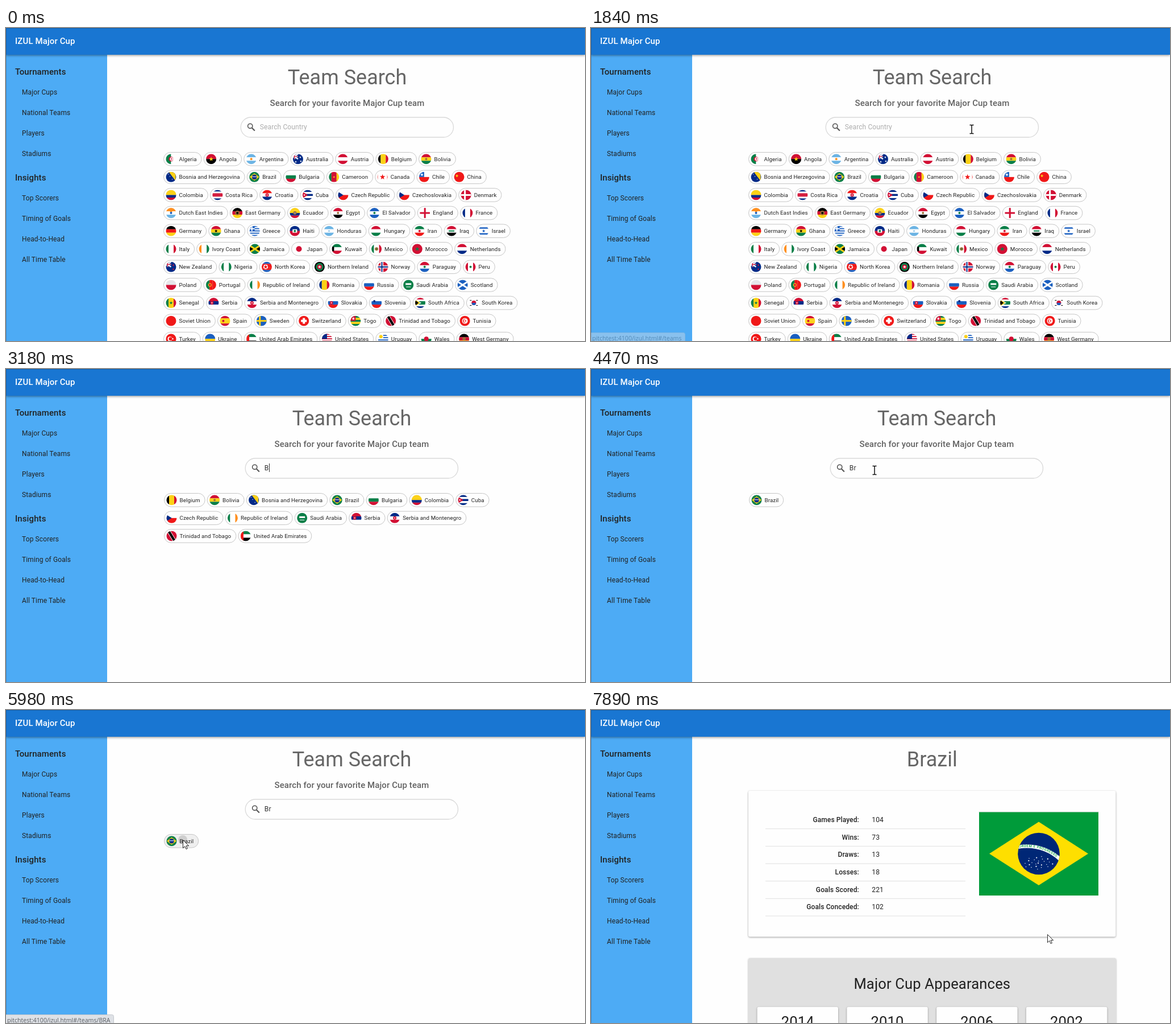
An HTML page for the animation above (8 s loop, 1019 by 550 pixels).

```html
<!DOCTYPE html>
<html lang="en">
<head>
<meta charset="utf-8">
<title>Team Search</title>
<style>
  html, body { margin: 0; width: 100%; height: 100%; overflow: hidden; background: #fefefe; }
  svg { display: block; width: 100vw; height: 100vh; }
  text { font-family: Roboto, sans-serif; fill: #212121; white-space: pre; }
  .paper { fill: #fefefe; filter: drop-shadow(0 1px 1.5px #0006); }
  .chip rect.pill { stroke: #c6c6c6; }
</style>
</head>
<body>
<svg id="stage" viewBox="0 0 1019 550"></svg>
<script>
const LOOP = 8000;
const COLORS = {
  r: '#d21034', b: '#012a87', g: '#0a7f48', y: '#fcd116', w: '#fff', k: '#000',
  o: '#ff8f1f', c: '#6cb4e4', n: '#a0703a', l: '#1a5fc0', e: '#e6e6ea', f: '#f01818'
};
// Each flag is a list of marks: kind, colour letters, then sizes (flag space is centred on 0,0).
const TEAMS = `Algeria|vgw or4 ow3,1 sr2,1
Angola|hrk sy4
Argentina|hcwc oo2
Australia|hb uw sw2,-4,5 sw2,4,-3 sw2,5,4
Austria|hrwr
Belgium|vkyr
Bolivia|hryg on2
Bosnia and Herzegovina|hb py-4,-9,8,-9,8,7 sw1,-5,-5 sw1,-2,-1 sw1,2,4
Brazil|hg py-8.5,0,0,-6.5,8.5,0,0,6.5 ob4.3 bw-4,-1,8,1
Bulgaria|hwgr
Cameroon|vgry sy2
Canada|vfwwwf sf5
Chile|hwf ql sw3,-4,-4
China|hf sy3,-4,-2
Colombia|hyybr
Costa Rica|hbwrrwb
Croatia|hfwb or3 ow1
Cuba|hbwbwb tr sw2,-6
Czech Republic|hwf tb
Czechoslovakia|hwf tb
Denmark|hr xw3,-2
Dutch East Indies|howc oo2,0,-3 ol2
East Germany|hkry on4 ok2
Ecuador|hyybr on3 oc1
Egypt|hrwk on2
El Salvador|hlwl og2
England|hw xr3
France|vbwr
Germany|hkfy
Ghana|hryg sk3
Greece|hlwlwlwlwl ql bw-9,-5,9,2 bw-6,-9,2,9
Haiti|hbr bw-4,-3,8,6 og2
Honduras|hcwc sc2
Hungary|hrwg
Iran|hgwf or2
Iraq|hrwk bg-5,-1,10,2
Israel|hwlwwwlw sl3
Italy|vgwr
Ivory Coast|vowg
Jamaica|hg tk pk14,-9,0,0,14,9 dy3
Japan|hw or5
Kuwait|hgwr bk-9,-4,4,8
Mexico|vgwr on3 og1
Morocco|hr sg4
Netherlands|hrwb
New Zealand|hb uw sr2,4,-3 sr2,4,4
Nigeria|vgwg
North Korea|hlfffl ow4,-2 sf4,-2
Northern Ireland|hk og7 or4 sw3
Norway|hr xw5,-2 xb2,-2
Paraguay|hrwl og2
Peru|vrwr og2
Poland|her
Portugal|vggfff oy3,-2 or2,-2
Republic of Ireland|vgwo
Romania|vbyr
Russia|hwlf
Saudi Arabia|hg bw-5,-3,10,3 bw-4,3,8,1
Scotland|hl dw3
Senegal|vgyr sg3
Serbia|hrbw or3,-3 ow1,-3
Serbia and Montenegro|hbwr or3 ow1
Slovakia|hwlf or3,-3 ow1,-3
Slovenia|hwlf ob2,-4,-3
South Africa|hrwggwb tw2 ty tk-3
South Korea|hw or4 pl-4,0,4,0,2,4,-2,4 bk-7,-5,3,1 bk4,-5,3,1 bk-7,4,3,1 bk4,4,3,1
Soviet Union|hf
Spain|hryyr or2,-3
Sweden|hl xy3,-3
Switzerland|hf bw-2,-5,4,10 bw-5,-2,10,4
Togo|hgygyg qr sw3,-4,-4
Trinidad and Tobago|hr pw-9,-9,-2,-9,9,9,2,9 pk-8,-9,-3,-9,8,9,3,9
Tunisia|hf ow5 of3.5 ow3,1 sf2,1
Turkey|hf ow4,-2 of3,-1 sw2,3
Ukraine|hly
United Arab Emirates|hgwk bf-9,-9,5,18
United States|hrwrwrwrwr qb
Uruguay|hwlwlwlwlw qw oy3,-4,-4
Wales|hwg or4
West Germany|hkry on3`.split('\n').map(line => line.split('|'));

const pen = document.createElement('canvas').getContext('2d');
const measure = (str, font, spacing = 0) => {
  pen.font = font;
  return pen.measureText(str).width + spacing * str.length;
};
const rect = (x, y, w, h, fill, more = '') =>
  `<rect x="${x}" y="${y}" width="${w}" height="${h}" fill="${fill}" ${more}/>`;
const circle = (x, y, r, fill) => `<circle cx="${x}" cy="${y}" r="${r}" fill="${fill}"/>`;
const poly = (points, fill) => `<polygon points="${points}" fill="${fill}"/>`;
const text = (x, y, str, size, more = '') =>
  `<text x="${x}" y="${y}" font-size="${size}" ${more}>${str}</text>`;
const group = (id, body, more = '') => `<g id="${id}" ${more}>${body}</g>`;

function star(r, x = 0, y = 0) {
  return Array.from({ length: 10 }, (_, i) => {
    const a = i * Math.PI / 5, d = i % 2 ? r * .42 : r;
    return [x + d * Math.sin(a), y - d * Math.cos(a)].map(v => v.toFixed(2));
  }).join(' ');
}

const MARKS = {
  h: c => c.map((k, i) => rect(-14, -9 + 18 / c.length * i, 28, 18 / c.length + .1, k)).join(''),
  v: c => c.map((k, i) => rect(-13.5 + 27 / c.length * i, -9, 27 / c.length + .1, 18, k)).join(''),
  o: ([c], r, x = 0, y = 0) => circle(x, y, r, c),
  s: ([c], r, x, y) => poly(star(r, x, y), c),
  t: ([c], tip = 0) => poly(`-14,-9 ${tip},0 -14,9`, c),
  x: ([c], w, x = 0) => rect(x - w / 2, -9, w, 18, c) + rect(-9, -w / 2, 18, w, c),
  d: ([c], w) => `<path d="M-14-9 14 9M-14 9 14-9" stroke="${c}" stroke-width="${w}"/>`,
  q: ([c]) => rect(-14, -9, 14, 9, c),
  p: ([c], ...points) => poly(points, c),
  b: ([c], x, y, w, h) => rect(x, y, w, h, c),
  u: ([c]) => `<path d="M-14-9 0 0M-14 0 0-9M-6-9V0M-14-4.5H0" stroke="${c}" stroke-width="2.2"/>
    <path d="M-6-9V0M-14-4.5H0" stroke="${COLORS.r}" stroke-width="1.2"/>`
};
const flag = spec => spec.split(' ').map(mark => {
  const [, kind, letters, sizes] = mark.match(/^(.)([a-z]+)(.*)$/);
  return MARKS[kind]([...letters].map(l => COLORS[l]), ...(sizes ? sizes.split(',').map(Number) : []));
}).join('');

// Chips that contain the query, wrapped into rows.
function chipList(query, left) {
  const boxes = [];
  let x = left, y = 218.5, body = '';
  for (const [name, spec] of TEAMS) {
    if (!name.toLowerCase().includes(query)) continue;
    const w = measure(name, '9.75px Roboto, sans-serif', .104) + 35.5;
    if (x + w > 924) { x = left; y += 31.6; }
    body += `<g class="chip" transform="translate(${x.toFixed(2)} ${y.toFixed(2)})">
      ${rect(0, 0, w, 23.5, '#fefefe', 'class="pill" rx="11.75"')}
      <g transform="translate(13 11.75)"><g clip-path="url(#disc)">${flag(spec)}</g></g>
      ${text(27, 15.2, name, 9.75, 'letter-spacing=".104"')}</g>`;
    boxes.push({ x, y, w });
    x += w + 4;
  }
  return { body, boxes };
}
const QUERIES = ['', 'B', 'Br'];
const lists = QUERIES.map((q, i) => chipList(q.toLowerCase(), i ? 278.5 : 277.5));

const menuHead = (y, str) => text(16, y, str, 15, 'font-weight="500" letter-spacing=".1"');
const menuItems = (y, items) =>
  items.map((str, i) => text(28, y + i * 36.1, str, 12, 'letter-spacing=".11"')).join('');
const mid = 'text-anchor="middle"';

const frame = rect(0, 0, 178, 550, '#4dabf5') + rect(0, 0, 1, 550, '#3a87c6') +
  menuHead(82, 'Tournaments') + menuItems(117, ['Major Cups', 'National Teams', 'Players', 'Stadiums']) +
  menuHead(268, 'Insights') + menuItems(303, ['Top Scorers', 'Timing of Goals', 'Head-to-Head', 'All Time Table']) +
  rect(0, 0, 1019, 47, '#1976d2', 'style="filter:drop-shadow(0 1.5px 2px #0007)"') +
  rect(0, 0, 1019, 1, '#145ca5') + rect(0, 0, 1, 47, '#145ca5') +
  text(16, 27.5, 'IZUL Major Cup', 15, 'font-weight="500" letter-spacing=".11" style="fill:#fff"');

const search = group('top',
  text(600.5, 99, 'Team Search', 36, mid + ' style="fill:#666"') +
  text(600.5, 136.5, 'Search for your favorite Major Cup team', 15,
    mid + ' font-weight="500" letter-spacing=".09" style="fill:#626262"') +
  rect(413.2, 157, 374.3, 35, '#fefefe', 'rx="17.5" stroke="#d9d9d9" stroke-width="1.3"') +
  `<g fill="none" stroke="#555"><circle cx="429.7" cy="172.3" r="4.1" stroke-width="1.6"/>
   <path d="M432.8 175.4l5 5" stroke-width="2.1"/></g>` +
  text(446.8, 178, '', 12, 'id="field" letter-spacing=".11"') +
  rect(447, 166, 1, 15, '#333', 'id="caret"')) +
  lists.map((list, i) => group('list' + i, list.body)).join('') +
  group('ripple', circle(311, 228, 8, '#0002'));

const stats = [['Games Played', 104], ['Wins', 73], ['Draws', 13], ['Losses', 18],
  ['Goals Scored', 221], ['Goals Conceded', 102]];
const skyStars = Array.from({ length: 24 }, (_, i) => {
  const a = i * 2.4, d = 3.6 * Math.sqrt(i);
  return circle(787 + 1.55 * d * Math.cos(a), 269 + .68 * d * Math.sin(a), i % 3 ? .7 : 1.1, '#fff');
}).join('');
const bigFlag = rect(683, 179.5, 210, 146.5, '#009b3a') +
  poly('701,252.5 788,196.5 875,252.5 788,308', '#fedf00') + circle(788, 252.5, 36.8, '#002776') +
  `<g clip-path="url(#globe)"><circle cx="767" cy="326" r="86.6" fill="none" stroke="#fff" stroke-width="6.2"/>
   ${skyStars}<path id="band" d="M747.5 243.2A85 85 0 0 1 840 282" fill="none"/>
   <text font-size="6" font-weight="500" letter-spacing=".5" style="fill:#009b3a"><textPath href="#band"
   startOffset="6">ORDEM E PROGRESSO</textPath></text></g>`;

const team = text(600.3, 99, 'Brazil', 36, mid + ' style="fill:#666"') +
  rect(277, 142, 646.5, 256.5, '#fefefe', 'rx="3" class="paper"') +
  stats.map(([label, value], i) => {
    const y = 197 + i * 30.65;
    return text(471.8, y, label + ':', 12, 'text-anchor="end" font-weight="500" letter-spacing=".1"') +
      text(494.3, y, value, 12, 'letter-spacing=".11"') + rect(307, y + 11.2, 352, 1, '#e0e0e0');
  }).join('') +
  rect(682.5, 178.7, 211, 1.2, '#d6d6d6') + group('flag', bigFlag) +
  rect(277, 436, 647, 130, '#e0e0e0', 'rx="3" style="filter:drop-shadow(0 1px 1.5px #0005)"') +
  text(600.3, 490, 'Major Cup Appearances', 25.5, mid + ' letter-spacing=".19"') +
  [2014, 2010, 2006, 2002].map((year, i) =>
    rect(292.5 + i * 157.8, 521.7, 142.5, 60, '#fefefe', 'rx="3" class="paper"') +
    text(363.7 + i * 157.8, 557.3, year, 25.5, mid + ' letter-spacing=".19"')).join('');

const $ = id => document.getElementById(id);
$('stage').innerHTML = `<defs>
  <clipPath id="disc"><circle r="9"/></clipPath>
  <clipPath id="globe"><circle cx="788" cy="252.5" r="36.8"/></clipPath></defs>` +
  rect(0, 0, 1019, 550, '#fefefe') +
  group('search', search) + group('team', team) + frame +
  group('status', rect(-2, 535.5, 0, 20, '#dee1e6', 'id="statusBox" rx="3" stroke="#c3c7cc"') +
    text(2, 549, '', 10.6, 'id="statusText" style="font-family:\'Open Sans\',sans-serif;fill:#5a5e63"')) +
  group('arrow', '<path d="M.5.5V14.6l3.3-3.1 2.3 5 2.2-1-2.2-4.8h4.5z" fill="#fff" stroke="#111" stroke-width=".9"/>') +
  group('beam', `<path id="i" d="M-3.5-7.5H-1L0-6.8 1-7.5H3.5M0-7V7M-3.5 7.5H-1L0 6.8 1 7.5H3.5"
    fill="none" stroke="#fff" stroke-width="3"/><use href="#i" style="stroke:#111"/>
    <path d="M-3.5-7.5H-1L0-6.8 1-7.5H3.5M0-7V7M-3.5 7.5H-1L0 6.8 1 7.5H3.5" fill="none" stroke="#111" stroke-width="1.5"/>`);

const PATH = [ // time, x, y of the pointer
  [600, 971, 490], [1360, 701, 188], [1790, 670, 178], [2140, 680, 170], [4170, 680, 170],
  [4450, 499, 178], [4940, 347, 207], [5430, 311, 228], [6840, 311, 228], [7670, 798, 394],
  [7740, 798, 394], [7870, 803, 394], [LOOP, 803, 394]
];
const ramp = (t, a, b) => Math.min(1, Math.max(0, (t - a) / (b - a)));

function pointer(t) {
  const at = 600 + Math.floor((t - 600) / 70) * 70;
  const i = Math.max(1, PATH.findIndex(k => k[0] > at));
  const [a, x, y] = PATH[i - 1], [b, x2, y2] = PATH[i];
  let p = ramp(at, a, b);
  if (b - a > 700) p = p * p * (3 - 2 * p);
  return { x: x + (x2 - x) * p, y: y + (y2 - y) * p };
}
const show = (id, on) => $(id).style.display = on ? '' : 'none';
const place = (id, x, y) => $(id).setAttribute('transform', `translate(${x.toFixed(1)} ${y.toFixed(1)})`);
const pills = lists.map((_, i) => [...$('list' + i).querySelectorAll('.pill')]);

function draw(t) {
  const step = t < 3180 ? 0 : t < 3640 ? 1 : 2, query = QUERIES[step];
  show('search', t < 6050);
  show('team', t >= 6310);
  show('flag', t >= 6650);
  show('ripple', t >= 5900);
  lists.forEach((_, i) => show('list' + i, i === step));
  place('top', step ? 8 : 0, 0);

  $('field').textContent = query || 'Search Country';
  $('field').style.fill = query ? '#333' : '#adadad';
  const since = [1920, 3180, 3640][step];
  show('caret', t >= since && t < 5900 && Math.floor((t - since) / 530) % 2 === 0);
  $('caret').setAttribute('x', 447 + Math.round(measure(query, '12px Roboto, sans-serif', .11)));

  const { x, y } = pointer(t);
  const visible = t >= 600 && (t < 3180 || t >= 4190);
  const typing = t < 6050 && y < 186;
  show('arrow', visible && !typing);
  show('beam', visible && typing);
  place('arrow', x, y);
  place('beam', x, y);
  lists[step].boxes.forEach((box, i) => {
    const over = visible && x > box.x && x < box.x + box.w && y > box.y && y < box.y + 23.5;
    pills[step][i].setAttribute('fill', over ? '#efefef' : '#fefefe');
  });

  const url = 'pitchtest:4100/izul.html#/teams' + (t > 4000 ? '/BRA' : '');
  $('statusText').textContent = url;
  $('statusBox').setAttribute('width', measure(url, '10.6px "Open Sans", sans-serif') + 10);
  $('status').style.opacity = t < 4000
    ? ramp(t, 1400, 1500) * (1 - ramp(t, 1700, 1940))
    : ramp(t, 5600, 5760) * (1 - ramp(t, 6310, 6480));
}

const start = performance.now();
function tick() {
  draw((performance.now() - start) % LOOP);
  requestAnimationFrame(tick);
}
tick();
</script>
</body>
</html>
```
